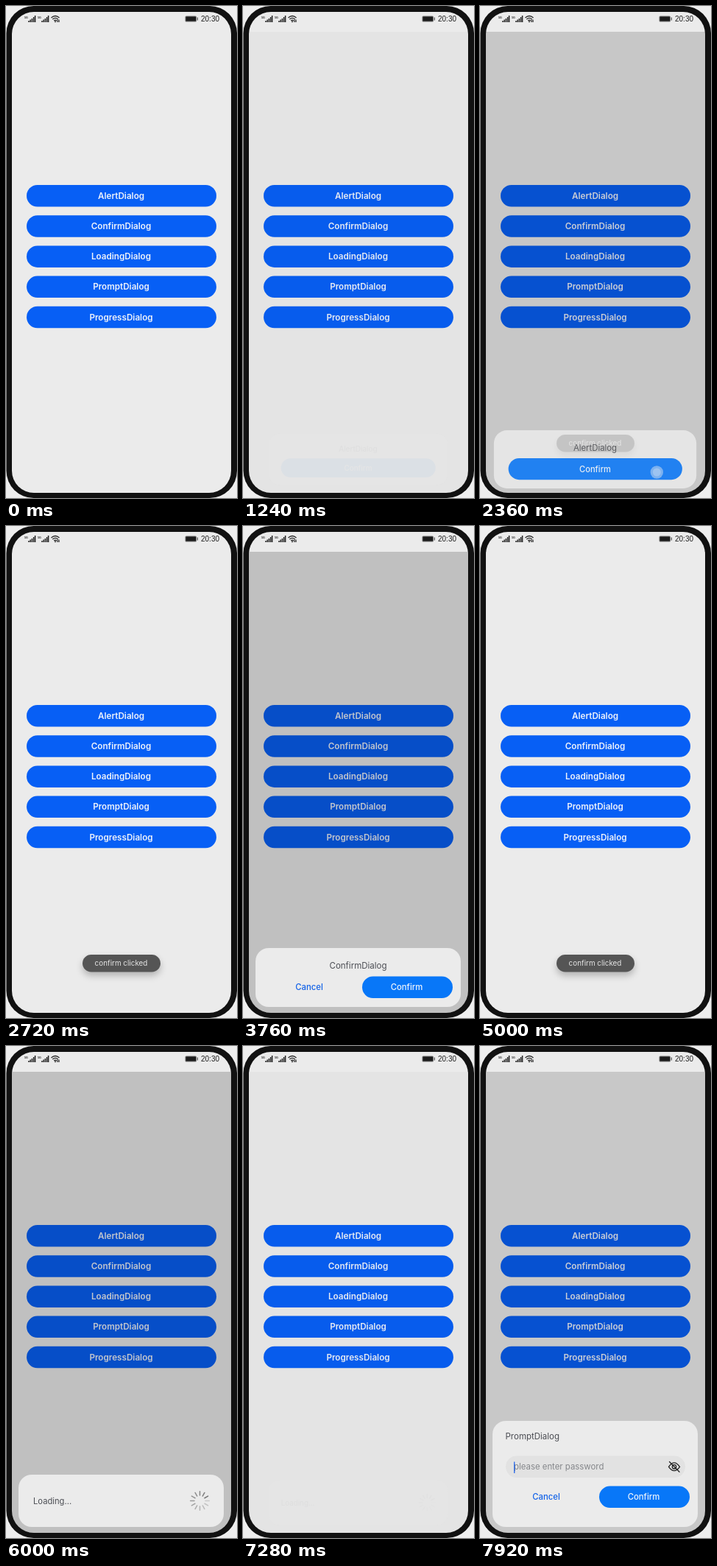
Write an HTML page that moves like this. It is 314 px wide and 668 px high and loops after 8 s.

```html
<!DOCTYPE html>
<html lang="en">
<head>
<meta charset="utf-8">
<title>Dialogs</title>
<style>
  html, body { margin: 0; width: 100%; height: 100%; overflow: hidden; background: #eee; }
  svg { display: block; width: 100%; height: 100%; }
  text { font-family: Inter, "Noto Sans", sans-serif; font-size: 11.5px; fill: #4c4e54; }
  .mid { text-anchor: middle; }
  .menu text { font-size: 11.7px; font-weight: 600; fill: #eef2fb; }
  .menu rect { fill: #075ff5; }
  .card { fill: #ebebeb; }
  .action { fill: #0877f8; }
  .label { font-size: 11.3px; font-weight: 500; fill: #eef4fc; }
  .cancel { font-size: 11.3px; font-weight: 500; fill: #1463e8; }
  .clock { font: 10px "Liberation Sans", sans-serif; fill: #222; }
  .generation { font: bold 3.6px "Liberation Sans", sans-serif; fill: #222; }
  #toast { filter: drop-shadow(0 5px 5px rgba(0, 0, 0, .24)); }
  #toast text { font-size: 9.9px; fill: #e6e6e6; }
</style>
</head>
<body>
<svg viewBox="0 0 314 668">
  <defs>
    <clipPath id="screen"><rect x="8" y="8" width="298" height="653" rx="30"/></clipPath>
    <g id="signal">
      <text class="generation" x="0" y="16.5">5G</text>
      <path d="M6 20v2M8.2 18.5V22M10.4 17v5M12.6 15v7M14.6 13v9" stroke="#222" stroke-width="1.5"/>
    </g>
  </defs>
  <rect x=".5" width="313.5" height="668" rx="37" fill="#111"/>
  <g clip-path="url(#screen)">
    <rect x="8" y="8" width="298" height="653" fill="#ebebeb"/>
    <use href="#signal" x="25"/>
    <use href="#signal" x="43"/>
    <g fill="none" stroke="#222" stroke-width="1.2">
      <path d="M61.5 16Q67 11 72.500 16M63.300 18Q67 14.700 70.700 18M65.200 20Q67 18.400 68.800 20"/>
      <path d="M70 18.500V22M72 18.500V22"/>
      <circle cx="67" cy="21.300" r=".4"/>
    </g>
    <rect x="243.500" y="13.500" width="15.500" height="8" rx="1.500" fill="#777"/>
    <rect x="244.500" y="14.500" width="13.500" height="6" rx=".6" fill="#1c1c1c"/>
    <path d="M260.300 15.500v4" stroke="#555" stroke-width="1.200"/>
    <text class="clock" x="265" y="20.500">20:30</text>

    <g class="menu mid" id="menu"></g>
    <rect id="shade" x="8" y="35" width="298" height="626"/>

    <g id="alert">
      <rect class="card" x="17" y="573" width="279" height="80" rx="18"/>
      <text class="mid" x="156.500" y="601">AlertDialog</text>
      <rect class="action" x="37" y="611.500" width="239.500" height="29.500" rx="14.750"/>
      <text class="label mid" x="156.500" y="630.300">Confirm</text>
    </g>
    <g id="confirm">
      <rect class="card" x="17" y="573" width="279" height="80" rx="18"/>
      <text class="mid" x="156.500" y="601">ConfirmDialog</text>
      <text class="cancel mid" x="90" y="630.300">Cancel</text>
      <rect class="action" x="162" y="611.500" width="123" height="29.500" rx="14.750"/>
      <text class="label mid" x="222.500" y="630.300">Confirm</text>
    </g>
    <g id="loading">
      <rect class="card" x="17" y="582" width="279" height="71" rx="18"/>
      <text x="37" y="621.500" style="font-size:11.2px">Loading...</text>
      <g id="spinner" stroke="#777" stroke-width="1.500" stroke-linecap="round"></g>
    </g>
    <g id="prompt">
      <rect class="card" x="17" y="509" width="279" height="144" rx="18"/>
      <text x="34.500" y="533.500">PromptDialog</text>
      <rect x="35" y="556.500" width="244" height="29.500" rx="14.750" fill="#e2e2e2"/>
      <text x="46" y="575.200" style="font-size:11.4px;fill:#85878b">please enter password</text>
      <path d="M46.700 564.500v15.500" stroke="#2467ee" stroke-width="1.300"/>
      <g fill="none" stroke="#222" stroke-width="1.300" stroke-linecap="round">
        <path d="M256.500 571.300Q264 560.500 271.500 571.300Q264 582 256.500 571.300Z"/>
        <circle cx="264" cy="571.300" r="2.700"/>
        <path d="M257.500 564.500L271 578.300"/>
      </g>
      <text class="cancel mid" x="90" y="616.300">Cancel</text>
      <rect class="action" x="162" y="597.500" width="123" height="29.500" rx="14.750"/>
      <text class="label mid" x="222.500" y="616.300">Confirm</text>
    </g>

    <g id="toast">
      <rect x="104" y="582" width="106" height="23.500" rx="11.750" fill="#555"/>
      <text class="mid" x="156.500" y="597.300">confirm clicked</text>
    </g>
    <g id="tap">
      <circle cx="240.300" cy="633" r="8.700" fill="#b9d2ee" opacity=".6"/>
      <circle cx="240.300" cy="633" r="5.500" fill="#d8e4f2" opacity=".35"/>
    </g>
  </g>
</svg>
<script>
const LOOP = 8000;
const $ = id => document.getElementById(id);
const clamp = v => Math.max(0, Math.min(1, v));

// Keys are [ms, value]; two keys at one time make a hard change.
const tracks = {
  shade: [[1200, 0], [1440, 1], [2360, 1], [2360, .83], [2520, .83], [2520, 0],
    [3400, 0], [3640, 1], [4800, 1], [4800, .97], [5000, .97], [5000, 0],
    [5560, 0], [5800, 1], [7200, 1], [7200, .85], [7280, .17], [7320, .17], [7400, .82]],
  alert: [[1200, 0], [1440, 1], [2360, 1], [2360, .83], [2520, .83], [2520, 0]],
  confirm: [[3400, 0], [3640, 1], [4800, 1], [4800, .95], [5000, .95], [5000, 0]],
  loading: [[5560, 0], [5800, 1], [7200, 1], [7200, .85], [7280, .17], [7320, .17], [7320, 0]],
  prompt: [[7320, 0], [7400, .85], [7640, .85], [7920, 1]],
  toast: [[2360, 0], [2360, .22], [2520, .22], [2520, 1], [3240, 1], [3400, 0],
    [5000, 0], [5000, 1], [5360, 1], [5520, 0]],
  tap: [[2360, 0], [2360, 1], [2520, 1], [2520, 0]]
};
const dialogCenters = { alert: 613, confirm: 613, loading: 617.5, prompt: 581 };
const spinnerTicks = [6000, 6200, 6320, 6480, 6720, 6920, 7200];

function valueAt(keys, t) {
  const next = keys.findIndex(key => key[0] > t);
  if (next === 0) return keys[0][1];
  if (next < 0) return keys[keys.length - 1][1];
  const [t0, v0] = keys[next - 1], [t1, v1] = keys[next];
  return v0 + (v1 - v0) * (t - t0) / (t1 - t0);
}

function setOpacity(id, value) {
  $(id).setAttribute("opacity", value);
  $(id).style.display = value > 0 ? "" : "none";
}

function poseDialog(id, centerY, t) {
  const shown = valueAt(tracks[id], t);
  const scale = 1 - .16 * (1 - shown) ** 1.4;
  const drop = Math.min(2.5, 15 * (1 - shown));
  setOpacity(id, clamp((shown - .14) / .8));
  $(id).setAttribute("transform",
    `translate(156.5 ${centerY + drop}) scale(${scale}) translate(-156.5 ${-centerY})`);
}

function draw(t) {
  setOpacity("shade", .183 * valueAt(tracks.shade, t));
  for (const id in dialogCenters) poseDialog(id, dialogCenters[id], t);
  setOpacity("toast", valueAt(tracks.toast, t));
  setOpacity("tap", valueAt(tracks.tap, t));
  const tick = spinnerTicks.filter(ms => ms <= t).pop() ?? t;
  const turn = Math.floor((tick - 6000) / 100) * 30;
  $("spinner").setAttribute("transform", `translate(263.5 617.5) rotate(${turn})`);
}

["Alert", "Confirm", "Loading", "Prompt", "Progress"].forEach((name, i) => {
  const y = 243 + i * 41.2;
  $("menu").innerHTML += `<rect x="28" y="${y}" width="258" height="29.5" rx="14.75"/>
    <text x="156.5" y="${y + 18.8}">${name}Dialog</text>`;
});
for (let i = 0; i < 12; i++) {
  $("spinner").innerHTML +=
    `<path d="M0-7.5V-12.800" transform="rotate(${60 - i * 30})" opacity="${1 - i * .065}"/>`;
}

const start = performance.now();
function frame() {
  draw((performance.now() - start) % LOOP);
  requestAnimationFrame(frame);
}
frame();
</script>
</body>
</html>
```
